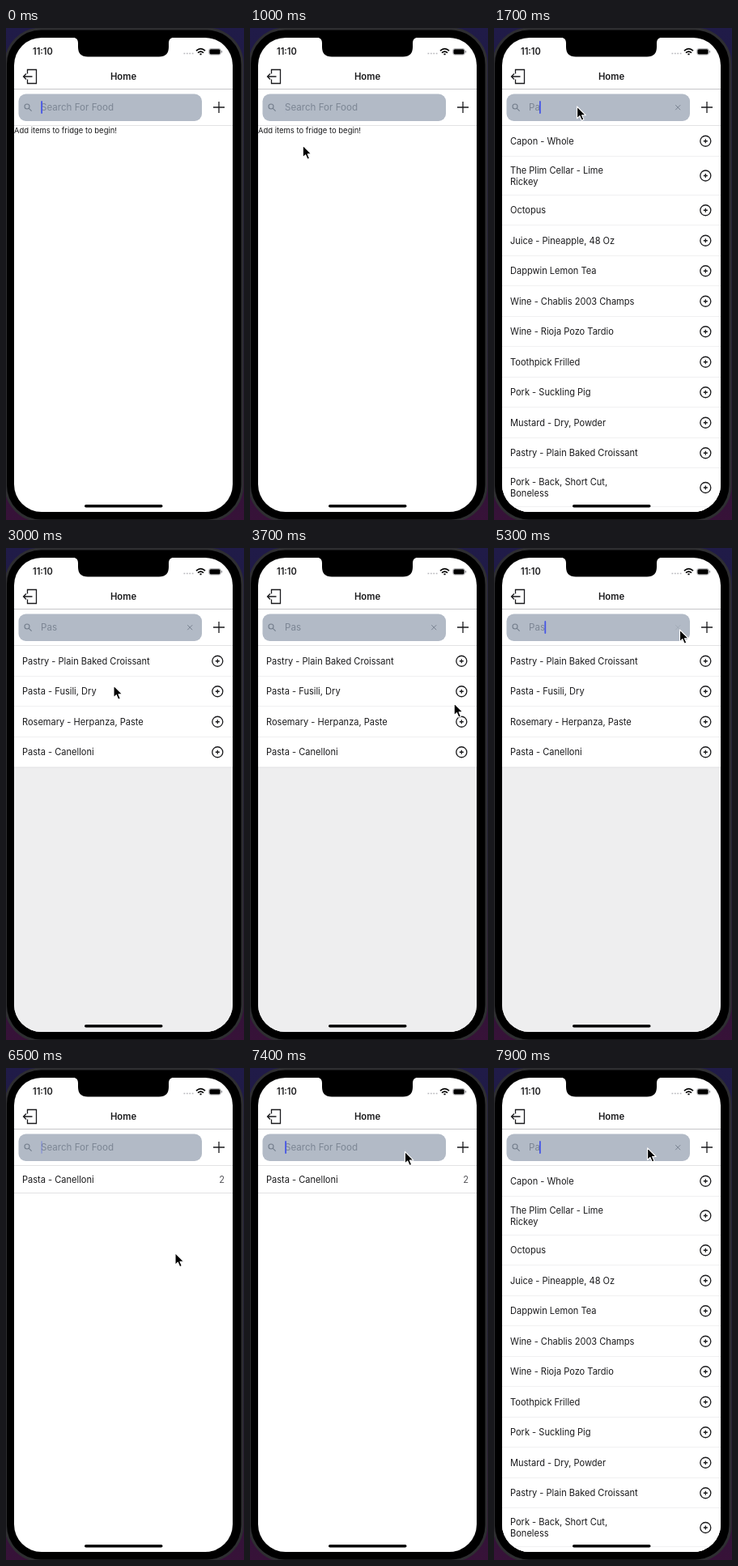
These frames come from a looping animation (294x608 px, 8 s). An HTML page:

```html
<!DOCTYPE html>
<html lang="en">
<head>
<meta charset="utf-8">
<style>
  html, body { margin: 0; width: 100%; height: 100%; overflow: hidden; background: #000; }
  svg { display: block; width: 294px; height: 608px; font-family: Inter, Roboto, sans-serif; font-size: 11.05px; fill: #1a1a1c; }
  .line { fill: none; stroke: #1a1a1c; stroke-width: 1.3; }
  .bold { font-weight: 600; }
  .rule { stroke: #e2e2e4; }
  .hint { font-size: 11.6px; fill: #7c8694; }
</style>
</head>
<body>
<svg viewBox="0 0 294 608">
  <defs>
    <linearGradient id="desk" x2="0" y2="1">
      <stop offset="0" stop-color="#201b48"/>
      <stop offset=".6" stop-color="#1d163c"/>
      <stop offset="1" stop-color="#371238"/>
    </linearGradient>
    <clipPath id="screen"><rect x="10" y="12" width="270" height="586" rx="34"/></clipPath>
  </defs>

  <rect width="294" height="608" fill="url(#desk)"/>
  <rect x="-.5" y="1" width="292.5" height="608" rx="44" fill="#000" stroke="#2e2e31" stroke-width="3"/>

  <g clip-path="url(#screen)">
    <rect x="10" y="11" width="270" height="588" fill="#fff"/>
    <g id="home">
      <text id="empty" x="10" y="130" font-size="9.46">Add items to fridge to begin!</text>
      <g id="stocked">
        <text x="20" y="142">Pasta - Canelloni</text>
        <text x="270" y="142" text-anchor="end" fill="#55555a">2</text>
        <path class="rule" d="M10 154.5H280"/>
      </g>
    </g>
    <g id="broad"></g>
    <g id="narrow"></g>

    <path d="M10 75.5H280" stroke="#c6c6c9"/>
    <path class="rule" d="M10 120.5H280"/>
    <path d="M82 11.500Q89 12 89 18.500V23.500Q89 35.500 101 35.500H189Q201 35.500 201 23.500V18.500Q201 12 208 11.500Z" fill="#000"/>

    <text class="bold" x="33" y="33">11:10</text>
    <path d="M219.5 31.5H232" stroke="#b9b9bd" stroke-width="1.6" stroke-dasharray="1.8 1.6"/>
    <g fill="none" stroke="#000" stroke-width="1.7">
      <path d="M235 28.2Q240.5 23.2 246 28.2M237 30.6Q240.5 27.6 244 30.6"/>
      <path d="M239.4 32.4H241.6"/>
    </g>
    <rect x="250.7" y="25.5" width="14.6" height="7.6" rx="2.3" fill="none" stroke="#a2a2a6" stroke-width=".8"/>
    <rect x="251.4" y="26.2" width="13.2" height="6.2" rx="1.6" fill="#000"/>
    <path d="M266.6 28V30.6" stroke="#909094"/>

    <text class="bold" x="145" y="64" text-anchor="middle" font-size="11.3">Home</text>
    <path class="line" d="M26.5 56.5V51.5H37.500V68.5H26.5V63.5M32.5 60H21.500M25 56.5L21.500 60L25 63.5"/>

    <rect x="15.5" y="81.5" width="226.5" height="33.5" rx="9" fill="#b2bac6"/>
    <g fill="none" stroke="#727c8b" stroke-width="1.1">
      <circle cx="26" cy="97" r="3"/>
      <path d="M28.3 99.3L31.6 102.6"/>
      <path id="clear" d="M224.2 95.2L230.2 101.2M230.2 95.2L224.2 101.2" stroke-width=".9"/>
    </g>
    <text id="query" class="hint" x="43" y="102.3"></text>
    <rect id="caret" y="90" width="1.8" height="16" rx=".9" fill="#4656e6"/>
    <path class="line" d="M256 98H270M263 91V105" stroke-width="1.5"/>

    <rect x="97" y="589" width="96.5" height="3.6" rx="1.8" fill="#000"/>
  </g>

  <path id="pointer" d="M0 0V14.8L3.3 11.7L5.7 17.2L8.3 16.1L6 10.7H10.6Z" fill="#000" stroke="#fff" stroke-width="1.1" stroke-linejoin="round"/>
</svg>

<script>
const LOOP = 8000;
const $ = id => document.getElementById(id);
const show = (id, on) => $(id).setAttribute('display', on ? 'inline' : 'none');
const clamp = x => Math.min(1, Math.max(0, x));

const broadItems = [
  'Capon - Whole', 'The Plim Cellar - Lime|Rickey', 'Octopus', 'Juice - Pineapple, 48 Oz',
  'Dappwin Lemon Tea', 'Wine - Chablis 2003 Champs', 'Wine - Rioja Pozo Tardio',
  'Toothpick Frilled', 'Pork - Suckling Pig', 'Mustard - Dry, Powder',
  'Pastry - Plain Baked Croissant', 'Pork - Back, Short Cut,|Boneless', ''
];
const narrowItems = [
  'Pastry - Plain Baked Croissant', 'Pasta - Fusili, Dry',
  'Rosemary - Herpanza, Paste', 'Pasta - Canelloni'
];

function listMarkup(items) {
  let top = 121;
  const rows = items.map(item => {
    const lines = item.split('|');
    const height = lines.length > 1 ? 48 : 37.5;
    const mid = top + height / 2;
    const text = lines.map((line, i) =>
      `<text x="20" y="${mid + 4 - (lines.length - 1) * 7 + i * 14}">${line}</text>`).join('');
    const row = `<rect x="10" y="${top}" width="270" height="${height}" fill="#fff"/>${text}
      <g class="line add"><circle cx="261.3" cy="${mid}" r="6.5"/>
      <path d="M258.8 ${mid}h5m-2.5 -2.5v5"/></g>
      <path class="rule" d="M10 ${top + height}H280"/>`;
    top += height;
    return row;
  });
  return '<rect x="10" y="121" width="270" height="480" fill="#eeeeef"/>' + rows.join('');
}
$('broad').innerHTML = listMarkup(broadItems);
$('narrow').innerHTML = listMarkup(narrowItems);
const lastAdd = [...document.querySelectorAll('#narrow .add')].pop();

// Pointer stops: time, x, y
const stops = [
  [500, -16, 250], [1300, 102.6, 97], [2200, 102.6, 97], [2600, 128, 144], [2750, 128, 144],
  [3000, 133, 170], [3200, 150, 172], [3600, 250, 181], [4000, 263.5, 250], [4700, 263.5, 250],
  [5200, 229.5, 101], [5700, 229.5, 101], [6100, 205, 290], [6400, 205, 290], [6500, 209, 228.5],
  [6800, 207, 143], [7000, 207, 143], [7500, 189.6, 98.8], [8000, 189.6, 98.8]
];

function pointerAt(t) {
  const next = stops.findIndex(stop => stop[0] > t);
  if (next <= 0) return stops[0].slice(1);
  const [t0, x0, y0] = stops[next - 1], [t1, x1, y1] = stops[next];
  const p = (t - t0) / (t1 - t0), ease = p * p * (3 - 2 * p);
  return [x0 + (x1 - x0) * ease, y0 + (y1 - y0) * ease];
}

function queryAt(t) {
  if (t >= 7700) return t < 7900 ? 'P' : 'Pa';
  if (t < 1500 || t >= 5500) return '';
  return t < 1700 ? 'P' : t < 1900 ? 'Pa' : 'Pas';
}

function caretOpacity(t) {
  if (t < 400 || t >= 7700 || (t >= 1500 && t < 2400)) return 1;
  const phase = t % 1000;
  return Math.min(clamp(phase / 100), clamp((530 - phase) / 100));
}

function render(t) {
  const query = queryAt(t);
  const pressed = (t >= 4100 && t < 4300) || (t >= 4400 && t < 4600);
  show('home', !query);
  show('empty', t < 1500);
  show('stocked', t >= 5500);
  show('broad', query && query.length < 3);
  show('narrow', query.length === 3);
  show('clear', query);
  $('query').textContent = query || 'Search For Food';
  $('caret').setAttribute('x', 43.2 + query.length * 6.4);
  $('caret').setAttribute('opacity', caretOpacity(t));
  $('clear').setAttribute('opacity', t >= 5200 && t < 5500 ? 0.25 : 1);
  lastAdd.setAttribute('opacity', pressed ? 0.35 : 1);
  $('pointer').setAttribute('transform', `translate(${pointerAt(t)})`);
}

const start = performance.now();
function tick() {
  render((performance.now() - start) % LOOP);
  requestAnimationFrame(tick);
}
render(0);
requestAnimationFrame(tick);
</script>
</body>
</html>
```
